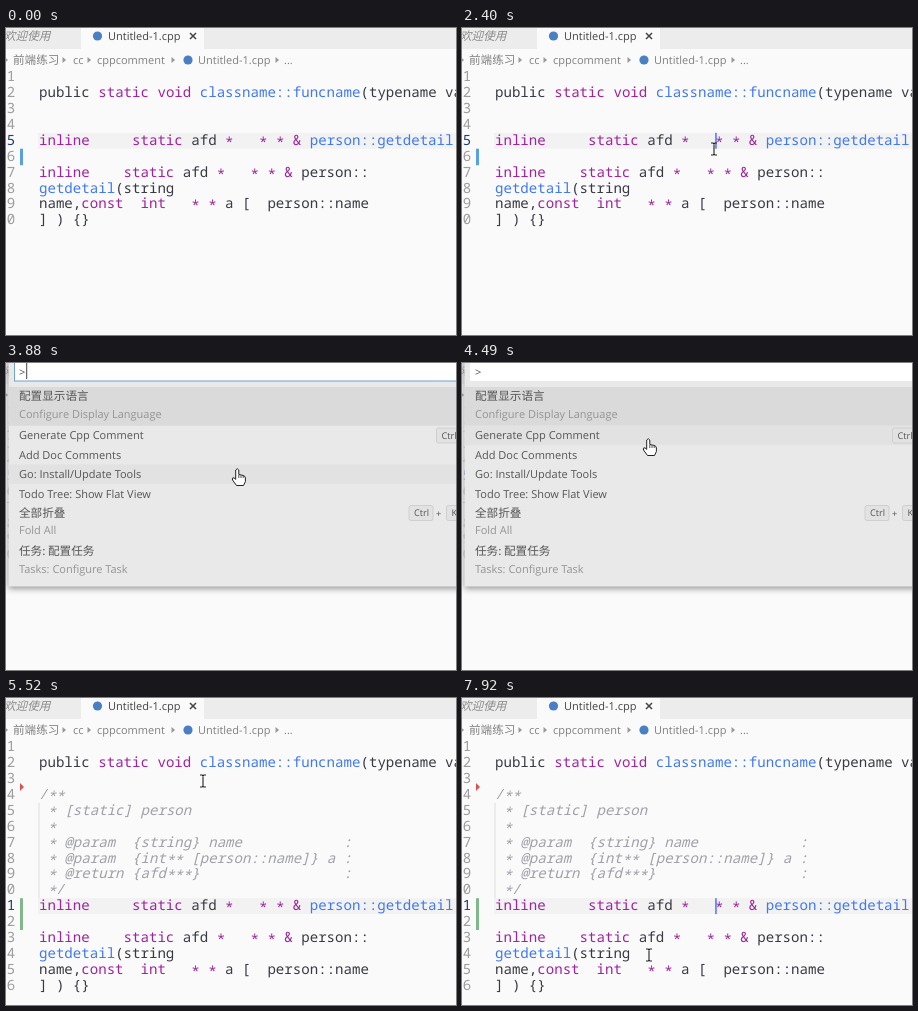
Animation of 450x307 px, one loop 7.99 s. Source, as an HTML page:

```html
<!DOCTYPE html>
<html lang="en">
<head>
<meta charset="utf-8">
<title>Comment generator</title>
<style>
html, body { margin: 0; width: 100%; height: 100%; overflow: hidden; background: #fafafa; }
svg { display: block; width: 450px; height: 307px; }
text { white-space: pre; text-rendering: geometricPrecision; }
.code { font: 14.1px "Noto Sans Mono", "DejaVu Sans Mono", monospace; }
.ui { font: 11px "Open Sans", "Noto Sans CJK SC", "Noto Sans CJK", sans-serif; }
.cjk { font: 11.6px "Noto Sans CJK SC", "Noto Sans CJK", sans-serif; }
.key { font: 9.2px "Open Sans", sans-serif; }
.note { font-style: italic; }
#panel { filter: drop-shadow(0 2px 3px #8f8f8f); }
</style>
</head>
<body>
<svg id="stage" viewBox="0 0 450 307"></svg>
<script>
const LOOP = 7990, OPEN = 2780, BLUR = 4490, CLOSE = 4570, INSERT = 4730, MARK = 4890;
const LEFT = 33, CHAR = 8.46, LINE = 15.9;
const INK = '#383a42', PURPLE = '#a0229f', BLUE = '#4078f2', GREY = '#a0a1a7';

const rowTop = n => 41.2 + LINE * (n - 1);
const rect = (x, y, w, h, fill, extra = '') =>
  `<rect x="${x}" y="${y}" width="${w}" height="${h}" fill="${fill}" ${extra}/>`;
const text = (x, y, str, cls, fill) =>
  `<text x="${x}" y="${y}" class="${cls}" fill="${fill}">${str.replace(/&/g, '&amp;').replace(/</g, '&lt;').replace(/>/g, '&gt;')}</text>`;
const group = (id, content) => `<g id="${id}">${content}</g>`;

// Code
const intro = ['', 'public static void classname::funcname(typename va', '', ''];
const rest = [
  'inline     static afd *   * * & person::getdetail(', '',
  'inline    static afd *   * * & person::',
  'getdetail(string',
  'name,const  int   * * a [  person::name',
  '] ) {}'
];
const comment = [
  '/**',
  ' * [static] person',
  ' *',
  ' * @param  {string} name            :',
  ' * @param  {int** [person::name]} a :',
  ' * @return {afd***}                 :',
  ' */'
];
const TOKEN = /\*+|&|classname::funcname|(?:person::)?getdetail|\w+|[^\w\s*&]+/g;
const WORD = /\*+|[^\s*]+/g;

function colour(token) {
  if (/^(static|void|inline|const|int|\*+|&)$/.test(token)) return PURPLE;
  return /funcname|getdetail/.test(token) ? BLUE : INK;
}

function codeLine(str, row) {
  const note = /^( \*|\/\*)/.test(str);
  return [...str.matchAll(note ? WORD : TOKEN)].map(m => {
    const drop = m[0][0] === '*' ? 2 : 0;   // centre the stars on the line
    return text(LEFT + m.index * CHAR, rowTop(row) + 12 + drop, m[0],
      note ? 'code note' : 'code', note ? GREY : colour(m[0]));
  }).join('');
}

function editor(id, lines, current) {
  let out = rect(32, rowTop(current), 418, LINE, '#f2f2f2');
  lines.forEach((str, i) => {
    const row = i + 1;
    out += text(0.7, rowTop(row) + 12, String(row % 10), 'code', row === current ? '#1f3f78' : '#9d9d9f');
    out += codeLine(str, row);
  });
  return group(id, out);
}

// Tabs and breadcrumbs
const dot = (x, y) => `<circle cx="${x}" cy="${y}" r="4.6" fill="#4a7fc4"/>`;
const chevron = x => `<path d="M${x - 1.5} 29l3.6 3l-3.6 3z" fill="#999"/>`;
const chrome =
  rect(0, 0, 450, 21, '#ececed') + rect(75, 0, 123, 22, '#fafafa') +
  text(-2, 11.5, '欢迎使用', 'cjk note', '#8a8a8a') +
  dot(91.5, 8) + text(102, 12, 'Untitled-1.cpp', 'ui', '#444') +
  '<path d="M184 5l6 6M190 5l-6 6" stroke="#444" stroke-width="1.5"/>' +
  [0, 58, 83, 167, 271].map(chevron).join('') +
  text(7, 36.3, '前端练习', 'cjk', '#808080') +
  text(67, 36, 'cc', 'ui', '#808080') +
  text(91, 36, 'cppcomment', 'ui', '#808080') +
  dot(182, 32) + text(192, 36, 'Untitled-1.cpp', 'ui', '#808080') +
  text(278, 36, '...', 'ui', '#808080');

// Command picker
const commands = [
  ['配置显示语言', 'Configure Display Language'],
  ['Generate Cpp Comment'],
  ['Add Doc Comments'],
  ['Go: Install/Update Tools'],
  ['Todo Tree: Show Flat View'],
  ['全部折叠', 'Fold All'],
  ['任务: 配置任务', 'Tasks: Configure Task']
];
const keycap = (x, y, w, label) =>
  rect(x, y, w, 15, '#e2e2e2', 'rx="2" stroke="#cfcfcf"') + text(x + 5, y + 10.8, label, 'key', '#555');

let nextY = 24;
const items = commands.map(([label, sub]) => {
  const item = { label, sub, y: nextY, h: sub ? 38.7 : 19.4 };
  nextY += item.h;
  return item;
});
const itemText = ({ label, sub, y }) =>
  text(13, y + (sub ? 13.3 : 13.6), label, sub ? 'cjk' : 'ui', '#555') +
  (sub ? text(13, y + 31, sub, 'ui', '#949494') : '');
const picker =
  rect(2.5, -40, 470, 263.5, '#e9e9e9', 'id="panel"') +
  rect(2.5, items[0].y, 450, items[0].h, '#dadada') +
  rect(2.5, 0, 450, items[1].h, '#e2e2e2', 'id="hover"') +
  rect(8, -10, 460, 28, '#fff') +
  rect(8.5, -10, 460, 28, 'none', 'id="focus" stroke="#6fa3c8"') +
  text(13, 12.6, '>', 'ui', '#555') +
  rect(20.2, 0, 1, 16, '#444', 'id="inputCaret"') +
  items.map(itemText).join('') +
  keycap(430.5, 65, 24, 'Ctrl') + keycap(403, 142.5, 24, 'Ctrl') +
  text(430, 153.5, '+', 'key', '#555') + keycap(440.5, 142.5, 16, 'K');

const stage = document.getElementById('stage');
stage.innerHTML =
  chrome +
  editor('before', [...intro, ...rest], 5) +
  editor('after', [...intro.slice(0, 3), ...comment, ...rest], 11) +
  rect(32.5, rowTop(5), 1, LINE * 6, '#dedede', 'id="guide"') +
  rect(14, 0, 3, LINE + 0.6, '#5a9fe0', 'id="changed"') +
  group('added', rect(14, rowTop(11), 3, LINE * 2, '#81b88b') +
    '<path d="M14 85l4 4l-4 4z" fill="#d9534f"/>') +
  rect(253.2, 0, 1.5, LINE, '#526fff', 'id="caret"') +
  group('picker', picker) +
  group('beam', '<path d="M-3-6h2.2L0-5.2L.8-6H3M0-5.5V5.5M-3 6h2.2L0 5.2L.8 6H3" fill="none" stroke="#222" stroke-width="1.1"/>') +
  group('hand', '<path d="M-2.3 1Q-.8-1.6 .8 1V5.5L5 6.4Q7.4 7 7.4 9V12.5L5.5 16.5H-1.5L-5.5 11Q-6.4 8.4-4 8.8L-2.3 10.4Z" fill="#fff" stroke="#222"/><path d="M.8 6v3M3 6.5v2.5M5.2 7v2" stroke="#222" stroke-width=".8"/>');

const el = {};
for (const node of stage.querySelectorAll('[id]')) el[node.id] = node;

// Pointer moves: start, end, number of held poses, way points
const moves = [
  [530, 930, 6, [[374, 276], [300, 190], [256, 101], [256, 112]]],
  [1160, 1540, 6, [[252, 114], [244, 120], [252, 121]]],
  [3730, 4110, 6, [[243, 114], [187, 76]]],
  [5520, 6140, 9, [[197, 83], [300, 170], [411, 270], [411, 302]]],
  [7290, 7750, 7, [[400, 297], [290, 270], [187, 218]]],
  [7920, 7920, 1, [[187, 257]]]
];
const caretOn = [[1440, 1940], [2400, OPEN], [CLOSE, 5120], [5600, 6120], [6600, 7140], [7640, LOOP]];
const inputOn = [[OPEN, 3250], [3730, 4260]];

const within = (t, spans) => spans.some(([a, b]) => t >= a && t < b);
const show = (node, on) => node.setAttribute('visibility', on ? 'inherit' : 'hidden');

function along(points, f) {
  const pos = f * (points.length - 1);
  const i = Math.floor(pos);
  const [a, b] = [points[i], points[i + 1] || points[i]];
  return a.map((v, k) => v + (b[k] - v) * (pos - i));
}

function pointer(t) {
  const move = moves.filter(m => t >= m[0]).pop();
  if (!move) return null;
  const [start, end, poses, points] = move;
  if (t >= end) return points[points.length - 1];
  const step = Math.floor((t - start) / (end - start) * (poses - 1));
  return along(points, step / (poses - 1)).map(Math.round);
}

function draw(t) {
  const open = t >= OPEN && t < CLOSE, inserted = t >= INSERT, marked = t >= MARK;
  show(el.before, !inserted);
  show(el.after, inserted);
  show(el.guide, inserted);
  show(el.changed, !marked);
  el.changed.setAttribute('y', rowTop(inserted ? 12 : 6));
  show(el.added, marked);
  show(el.caret, within(t, caretOn));
  el.caret.setAttribute('y', rowTop(inserted ? 11 : 5));

  const at = pointer(t);
  show(el.beam, at && !open);
  show(el.hand, open);
  if (at) {
    for (const node of [el.beam, el.hand])
      node.setAttribute('transform', `translate(${at[0]} ${at[1]})`);
  }

  show(el.picker, open);
  show(el.focus, open && t < BLUR);
  show(el.inputCaret, within(t, inputOn));
  if (open) {
    const item = items.find(i => at[1] + 2 >= i.y && at[1] + 2 < i.y + i.h);
    el.hover.setAttribute('y', item.y);
  }
}

function tick() {
  draw(performance.now() % LOOP);
  requestAnimationFrame(tick);
}
tick();
</script>
</body>
</html>
```
